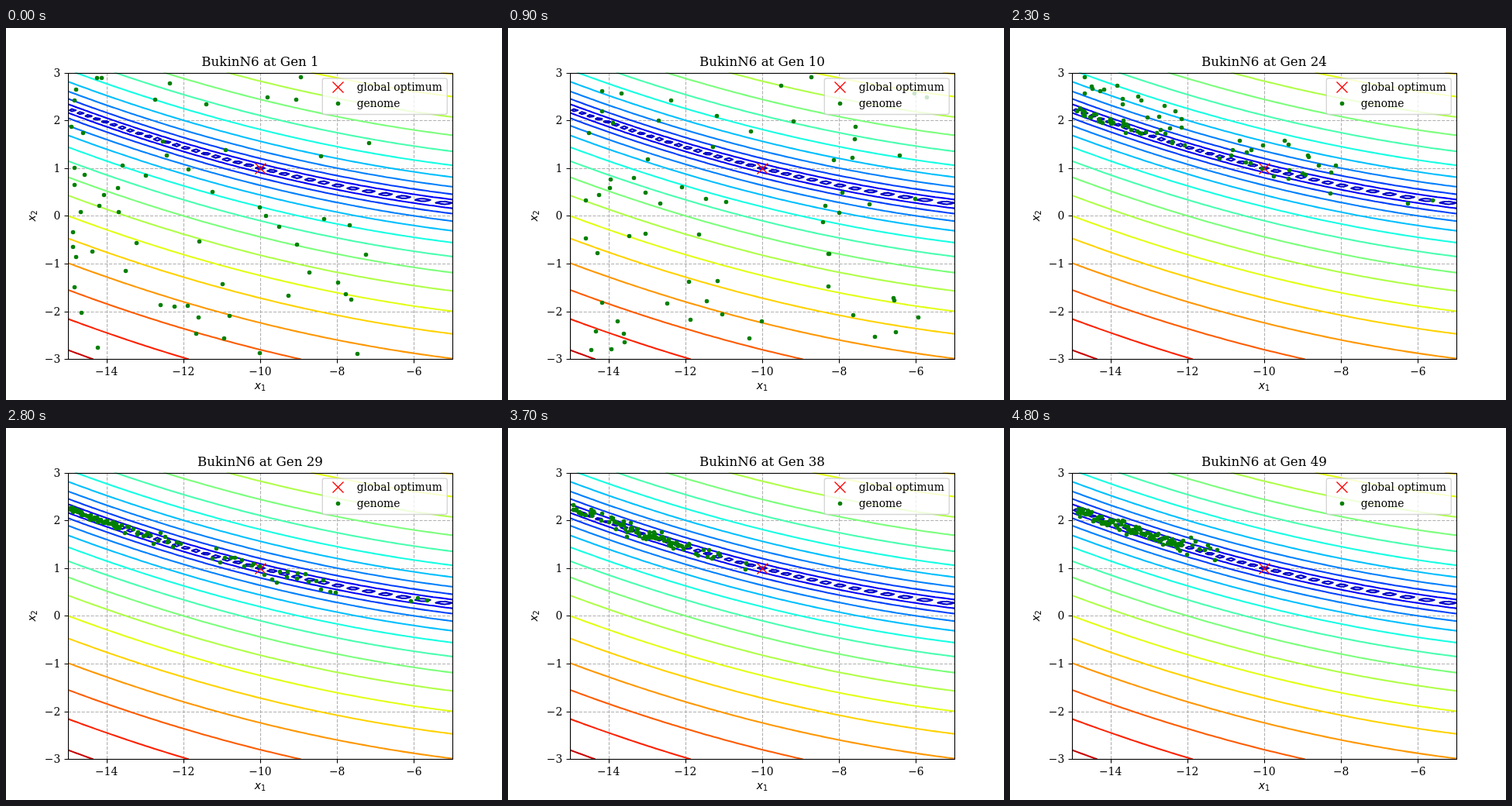
An HTML page for the animation above (4900 ms loop, 640x480 px).

```html
<!DOCTYPE html>
<html lang="en">
<head>
<meta charset="utf-8">
<title>BukinN6</title>
<style>
  html, body { margin: 0; width: 100%; height: 100%; overflow: hidden; background: #fff; }
  svg { display: block; }
  text { font: 13.89px "DejaVu Serif", "Noto Serif", serif; }
  #title { font-size: 16.67px; }
  .math { font: italic 13.89px "DejaVu Sans", sans-serif; }
  .sub { font-size: 9.72px; font-style: normal; }
  path { fill: none; }
  .thin { stroke: #000; stroke-width: 1.11; }
  .dots { stroke: #008000; stroke-width: 5.6; stroke-linecap: round; }
  .cross { stroke: #f00; stroke-width: 1.39; }
</style>
</head>
<body>
<svg width="640" height="480" viewBox="0 0 640 480">
  <clipPath id="plot"><rect x="80" y="57.6" width="496" height="369.6"/></clipPath>
  <path id="grid" stroke="#b0b0b0" stroke-width="1.11" stroke-dasharray="4.11 1.78"/>
  <g clip-path="url(#plot)">
    <g id="contours" stroke-width="2.08" stroke-linecap="round"></g>
    <path class="cross" d="M321.5 174.5l14 14m0-14l-14 14"/>
    <path id="genomes" class="dots" transform="translate(.5 .5)"/>
  </g>
  <path id="ticks" class="thin"/>
  <rect class="thin" x="80.5" y="58.5" width="496" height="369" fill="none"/>
  <g id="labels"></g>
  <text id="title" x="328" y="49.3" text-anchor="middle"></text>
  <text class="math" x="320.8" y="466">x<tspan class="sub" dy="2">1</tspan></text>
  <text class="math" transform="translate(38 249.6) rotate(-90)">x<tspan class="sub" dy="2">2</tspan></text>
  <rect x="408.3" y="65" width="161" height="46.5" rx="2.8" fill="#fff" fill-opacity=".8" stroke="#ccc" stroke-opacity=".8" stroke-width="1.39"/>
  <path class="cross" d="M421.5 69.5l14 14m0-14l-14 14"/>
  <path class="dots" d="M428.5 97.5h0"/>
  <text x="452.7" y="81">global optimum</text>
  <text x="452.7" y="102">genome</text>
</svg>
<script>
const $ = id => document.getElementById(id);
const px = x => 80 + (x + 15) * 49.6;
const py = y => 242.4 - y * 61.6;
const snap = v => Math.floor(v + .5) + .5;
const ramp = (t, a, b) => Math.min(1, Math.max(0, (t - a) / (b - a)));

// Axes
let grid = '', ticks = '', labels = '';
const number = n => String(n).replace('-', '\u2212');
for (let x = -14; x <= -6; x += 2) {
  const u = snap(px(x));
  grid += `M${u} 427V58`;
  ticks += `M${u} 427.5v5`;
  labels += `<text x="${px(x)}" y="447.5" text-anchor="middle">${number(x)}</text>`;
}
for (let y = -3; y <= 3; y++) {
  const v = snap(py(y));
  grid += `M80 ${v}H576`;
  ticks += `M80.5 ${v}h-5`;
  labels += `<text x="70.3" y="${py(y) + 5}" text-anchor="end">${number(y)}</text>`;
}
$('grid').setAttribute('d', grid);
$('ticks').setAttribute('d', ticks);
$('labels').innerHTML = labels;

// Contours: marching squares on a 100 x 100 grid
const CELLS = 99;
const bukin = (x, y) => 100 * Math.sqrt(Math.abs(y - .01 * x * x)) + .01 * Math.abs(x + 10);
const nodes = Array.from({ length: CELLS + 1 }, (_, i) =>
  Array.from({ length: CELLS + 1 }, (_, j) => {
    const x = -15 + 10 * i / CELLS, y = -3 + 6 * j / CELLS;
    return { x: px(x), y: py(y), z: bukin(x, y) };
  }));

function contour(level) {
  let d = '';
  for (let i = 0; i < CELLS; i++) for (let j = 0; j < CELLS; j++) {
    const ring = [nodes[i][j], nodes[i + 1][j], nodes[i + 1][j + 1], nodes[i][j + 1]];
    const cuts = [];
    ring.forEach((a, k) => {
      const b = ring[(k + 1) % 4];
      if (a.z < level === b.z < level) return;
      const s = (level - a.z) / (b.z - a.z);
      cuts.push((a.x + s * (b.x - a.x)).toFixed(2) + ' ' + (a.y + s * (b.y - a.y)).toFixed(2));
    });
    if (cuts.length === 4) {
      const middle = ring.reduce((sum, n) => sum + n.z, 0) / 4;
      if (middle < level !== ring[0].z < level) cuts.unshift(cuts.pop());
    }
    for (let k = 0; k < cuts.length; k += 2) d += `M${cuts[k]}L${cuts[k + 1]}`;
  }
  return d;
}

function jet(t) {
  const r = ramp(t, .35, .66) - .5 * ramp(t, .89, 1);
  const g = ramp(t, .125, .375) - ramp(t, .64, .91);
  const b = .5 + .5 * ramp(t, 0, .11) - ramp(t, .34, .65);
  return `rgb(${[r, g, b].map(c => Math.round(255 * Math.max(0, c)))})`;
}

let lines = '';
for (let level = 15; level <= 225; level += 15)
  lines += `<path stroke="${jet(level / 240)}" d="${contour(level)}"/>`;
$('contours').innerHTML = lines;

// Population
const random = (a, b) => {
  const s = Math.sin(a * 127.1 + b * 311.7) * 43758.5453;
  return s - Math.floor(s);
};
const bell = (a, b) => random(a, b + .1) + random(a, b + .4) + random(a, b + .7) - 1.5;
const valley = u => py(.01 * (-15 + (u - 80) / 49.6) ** 2);
const dots = (count, place) => Array.from({ length: count }, (_, i) => place(i));

// All over the plot, denser to the left
const scatter = (count, u0, u1, seed) => dots(count, i =>
  [u0 + (u1 - u0) * random(i, seed) ** 1.5, 60 + 366 * random(i, seed + 1)]);

// Along the valley from u0 to u1, raised by lift
const band = (count, u0, u1, spread, lift = 0) => dots(count, i => {
  const u = u0 + (u1 - u0) * (i + random(i, u0)) / count;
  return [u, valley(u) - lift + spread * bell(i, u1)];
});

const stages = [
  { gen: 1, wander: 36, dots: scatter(61, 83, 475, 1) },
  { gen: 10, wander: 16, dots: scatter(66, 98, 558, 5) },
  { gen: 18, wander: 8, dots: [...band(52, 90, 240, 30, 32), ...band(20, 277, 431, 20, 18)] },
  { gen: 29, wander: 5, dots: [...band(44, 81, 146, 5), ...band(20, 146, 225, 8),
    ...band(26, 262, 425, 12), ...band(3, 510, 555, 4)] },
  { gen: 34, wander: 5, dots: [...band(10, 81, 101, 5), ...band(66, 138, 215, 7), ...band(18, 215, 276, 8)] },
  { gen: 43, wander: 5, dots: [...band(84, 83, 236, 7, 2), ...band(12, 236, 357, 7, 4)] },
  { gen: 49, wander: 0, dots: [...band(94, 86, 224, 7), ...band(10, 224, 272, 16)] }
];

// Between two stages each dot moves over once and wanders along the valley.
function population(gen) {
  const next = Math.max(1, stages.findIndex(s => s.gen >= gen));
  const from = stages[next - 1], to = stages[next];
  const progress = (gen - from.gen) / (to.gen - from.gen);
  const wander = progress % 1 ? from.wander : 0;
  const count = Math.max(from.dots.length, to.dots.length);
  let d = '';
  for (let i = 0; i < count; i++) {
    const dot = (random(i, next + 50) < progress ? to : from).dots[i];
    if (!dot) continue;
    const u = Math.max(81, dot[0] + wander * bell(i, gen + 100));
    const v = dot[1] + valley(u) - valley(dot[0]) + wander * .6 * bell(i, gen + 200);
    d += `M${Math.round(u)} ${Math.round(v)}h0`;
  }
  return d;
}

let shown = 0;
function draw(now) {
  const gen = Math.floor(now % 4900 / 100) + 1;
  if (gen !== shown) {
    shown = gen;
    $('title').textContent = 'BukinN6 at Gen ' + gen;
    $('genomes').setAttribute('d', population(gen));
  }
  requestAnimationFrame(draw);
}
draw(performance.now());
</script>
</body>
</html>
```
